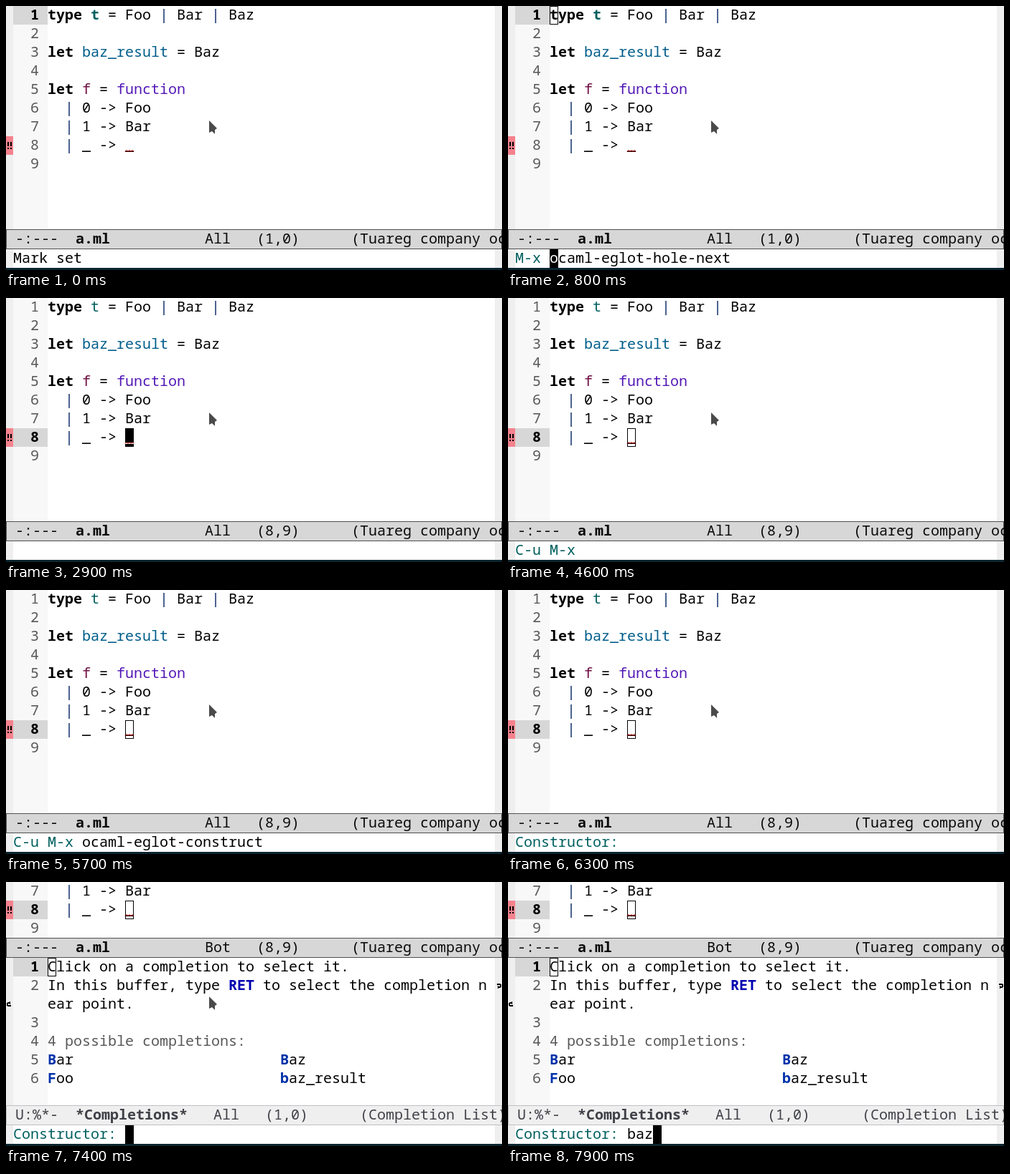
An HTML page with a canvas that plays this animation: 691x369 px, repeating every 8 s.

```html
<!DOCTYPE html>
<html lang="en">
<head>
<meta charset="utf-8">
<title>Editor session</title>
<style>
  html, body { margin: 0; width: 691px; height: 369px; overflow: hidden; background: #fff; }
  canvas { display: block; }
</style>
</head>
<body>
<canvas id="stage" width="691" height="369"></canvas>
<script>
const ctx = document.getElementById('stage').getContext('2d', { alpha: false });
const LOOP = 8000, CELL = 12, LINE = 26, TEXT_X = 58, ECHO_X = 10, ECHO_Y = 340;
const BLACK = '#000', TEAL = '#005f5f', CYAN = '#005e8b', NAVY = '#0b2a66',
      MAGENTA = '#721045', PURPLE = '#531ab6', BLUE = '#0031a9', KEY = '#0000b0',
      GRAY = '#595959', FRINGE = '#efefef', GUTTER = '#f8f8f8', CURRENT = '#d7d7d7';

// Each step overrides part of the state before it.
// point: buffer cursor; caret: minibuffer cursor column (-1 when hidden)
const HOLE = 'ocaml-eglot-hole-next', CONSTRUCT = 'ocaml-eglot-construct';
const steps = [
  [0, { line: 1, point: 'off', prompt: '', input: 'Mark set', caret: -1, boldType: true, list: false, mouse: true }],
  [300, { point: 'hollow', prompt: 'M-x ', input: '', caret: 4 }],
  [800, { input: HOLE }],
  [1200, { input: CONSTRUCT }],
  [1500, { input: HOLE }],
  [1800, { caret: 0 }],
  [1900, { line: 8, point: 'solid', prompt: '', input: '', caret: -1 }],
  [2400, { point: 'off', boldType: false }],
  [2900, { point: 'solid' }],
  [3900, { point: 'off' }],
  [4100, { point: 'hollow', prompt: 'C-u M-x ', caret: 8 }],
  [4600, { caret: -1 }],
  [5000, { input: HOLE, caret: 8 }],
  [5200, { input: CONSTRUCT }],
  [5700, { caret: -1 }],
  [5800, { prompt: 'Constructor: ', input: '', caret: 13 }],
  [6300, { caret: -1 }],
  [6400, { list: true, caret: 13 }],
  [6900, { caret: -1 }],
  [7400, { caret: 13 }],
  [7700, { input: 'ba', caret: 15, mouse: false }],
  [7900, { input: 'baz', caret: 16 }]
];

function rect(x, y, w, h, color) {
  ctx.fillStyle = color;
  ctx.fillRect(x, y, w, h);
}

function frame(x, y, w, h, color) {
  ctx.strokeStyle = color;
  ctx.lineWidth = 1;
  ctx.strokeRect(x + .5, y + .5, w - 1, h - 1);
}

function text(x, y, str, color = BLACK, bold = false) {
  ctx.font = (bold ? 'bold ' : '') + '20px "Noto Sans Mono", monospace';
  ctx.fillStyle = color;
  ctx.fillText(str, x, y + 19);
}

// Spans are strings or [string, color, bold].
function spans(x, y, list) {
  for (const item of list) {
    const [str, color, bold] = [].concat(item);
    text(x, y, str, color, bold);
    x += str.length * CELL;
  }
}

function polygon(points, color) {
  ctx.fillStyle = color;
  ctx.beginPath();
  points.forEach(([x, y]) => ctx.lineTo(x, y));
  ctx.fill();
}

function block(x, y, char) {
  rect(x, y, CELL, LINE, BLACK);
  text(x, y, char, '#fff');
}

function lineNumber(y, n, current) {
  if (current) rect(10, y, 48, LINE, CURRENT);
  text(34, y, String(n), current ? BLACK : GRAY, current);
}

function modeLine(y, active, state, name, rest) {
  const color = active ? '#0a0a0a' : '#404148';
  rect(0, y, 691, 28, active ? CURRENT : FRINGE);
  frame(0, y, 691, 28, active ? '#505050' : '#bfc0c4');
  spans(13, y + 1, [[state + '  ', color], [name, color, true], [rest, color]]);
}

function wave(x, y) {
  ctx.strokeStyle = '#d00000';
  ctx.lineWidth = 1;
  ctx.beginPath();
  for (let i = 0; i <= 6; i++) ctx.lineTo(x + i * 2, y + 19.5 + (i % 2 ? 0 : 2));
  ctx.stroke();
}

function sourceBuffer(s) {
  const bar = ['|', NAVY], branch = str => ['  ', bar, str];
  const code = [
    [['type ', BLACK, true], ['t', TEAL, s.boldType], ' = Foo ', bar, ' Bar ', bar, ' Baz'],
    [],
    [['let ', BLACK, true], ['baz_result', CYAN], ' = Baz'],
    [],
    [['let ', BLACK, true], ['f', MAGENTA], ' = ', ['function', PURPLE]],
    branch(' 0 -> Foo'),
    branch(' 1 -> Bar'),
    branch(' _ -> _'),
    []
  ];
  const first = s.list ? 6 : 0, rowY = n => (n - 1 - first) * LINE;
  for (let n = first + 1; n <= 9; n++) {
    lineNumber(rowY(n), n, n === s.line);
    spans(TEXT_X, rowY(n), code[n - 1]);
  }

  const errorY = rowY(8), holeX = TEXT_X + 9 * CELL;
  rect(0, errorY, 10, LINE, '#f5828d');
  for (const x of [2, 6]) {
    rect(x, errorY + 8, 2, 6, BLACK);
    rect(x, errorY + 16, 2, 2, BLACK);
  }

  const pointX = s.line === 8 ? holeX : TEXT_X, pointY = rowY(s.line);
  if (s.point === 'solid') block(pointX, pointY, '_');
  if (s.point === 'hollow') frame(pointX, pointY, CELL, LINE, BLACK);
  wave(holeX, errorY);

  const position = s.line === 8 ? '(8,9)' : '(1,0)';
  modeLine(s.list ? 78 : 312, true, '-:---', 'a.ml',
    `           ${s.list ? 'Bot' : 'All'}   ${position}      (Tuareg company oca`);
}

function wrapMark(x, y, flip) {
  ctx.save();
  ctx.translate(x, y);
  ctx.scale(flip, flip);
  rect(-3, -3, 5, 2, BLACK);
  rect(1, -2, 2, 4, BLACK);
  rect(-2, 1, 4, 2, BLACK);
  rect(-2, 0, 1, 4, BLACK);
  ctx.restore();
}

function completionBuffer() {
  const top = 106;
  const item = word => [[word[0], BLUE, true], word.slice(1)];
  const pair = (a, b) => [...item(a), ' '.repeat(27 - a.length), ...item(b)];
  const rows = [
    [1, ['Click on a completion to select it.']],
    [2, ['In this buffer, type ', ['RET', KEY, true], ' to select the completion n']],
    [0, ['ear point.']],
    [3, []],
    [4, [['4 possible completions:', GRAY]]],
    [5, pair('Bar', 'Baz')],
    [6, pair('Foo', 'baz_result')]
  ];
  rows.forEach(([n, line], i) => {
    const y = top + i * LINE;
    if (n) lineNumber(y, n, n === 1);
    spans(TEXT_X, y, line);
  });
  frame(TEXT_X, top, CELL, LINE, BLACK);
  wrapMark(687, 145, 1);
  wrapMark(4, 171, -1);
  modeLine(312, false, 'U:%*-', '*Completions*', '   All   (1,0)      (Completion List)');
}

function draw(t) {
  const s = Object.assign({}, ...steps.filter(([at]) => at <= t).map(step => step[1]));
  rect(0, 0, 691, 369, '#fff');
  rect(0, 0, 10, 366, FRINGE);
  rect(681, 0, 10, 366, FRINGE);
  rect(10, 0, 48, 312, GUTTER);
  sourceBuffer(s);
  if (s.list) completionBuffer();

  spans(ECHO_X, ECHO_Y, [[s.prompt, TEAL], s.input]);
  if (s.caret >= 0) block(ECHO_X + s.caret * CELL, ECHO_Y, (s.prompt + s.input)[s.caret] || ' ');
  rect(0, 366, 691, 3, '#0b2530');

  if (s.mouse) polygon([[283, 160], [294, 171], [291, 173], [291, 179], [287, 175], [283, 177]], '#4a4a4a');
}

function tick(now) {
  draw(now % LOOP);
  requestAnimationFrame(tick);
}
requestAnimationFrame(tick);
</script>
</body>
</html>
```
